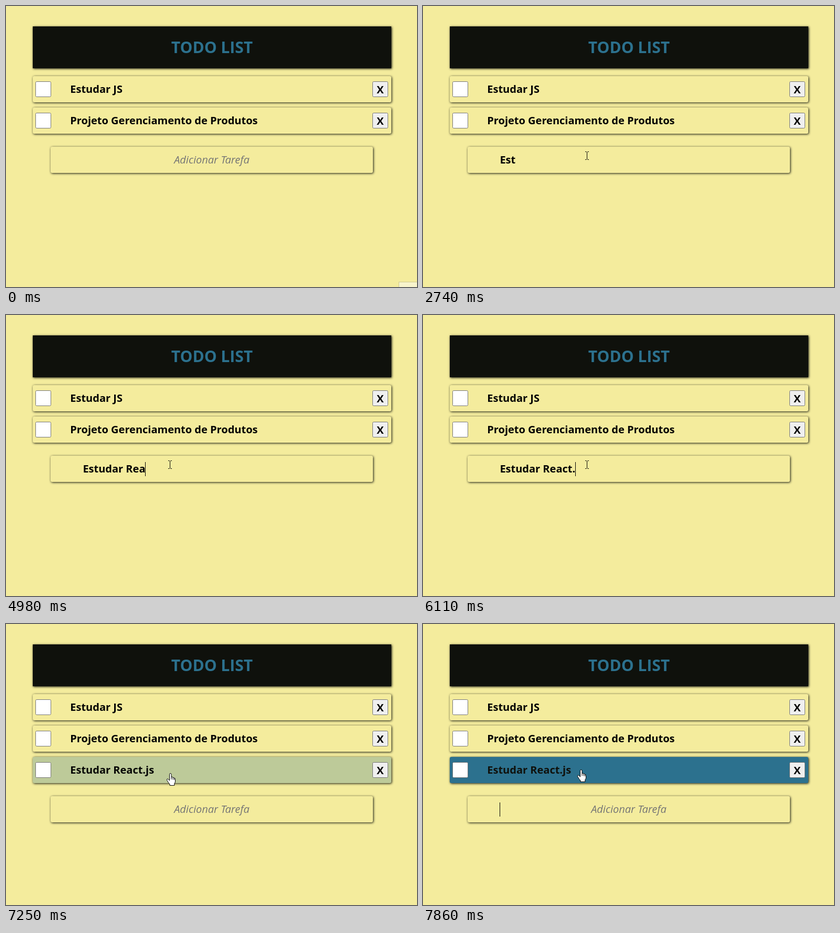
An HTML page that plays this animation: 783x537 px, repeating every 8000 ms.

```html
<!DOCTYPE html>
<html lang="pt">
<head>
<meta charset="utf-8">
<title>Todo list</title>
<style>
  html, body { margin: 0; width: 100%; height: 100%; overflow: hidden; background: #f4ec9d; }
  body { position: relative; font: bold 20px "Open Sans", sans-serif; color: #000; }
  body * { position: absolute; box-sizing: border-box; white-space: pre; }
  h1, .item, #field { margin: 0; box-shadow: 1px 1px 4px #0f110c; }
  h1 { left: 51px; top: 39px; width: 683px; height: 80px; background: #0f110c; color: #2c718e;
       font-size: 30px; line-height: 80px; text-align: center; }
  .item { left: 51px; width: 683px; height: 50px; line-height: 50px; border-radius: 3px; background: #f4ec9d; }
  .item b { left: 71.3px; }
  .item i, .item u { top: 10px; width: 30px; height: 30px; border: 1px solid #767676; border-radius: 2.5px; }
  .item i { left: 5px; background: #fff; }
  .item u { left: 647px; background: #efefef; line-height: 29px; text-align: center; text-decoration: none; color: #000; }
  #fresh { animation: hover .5s ease both paused; }
  @keyframes hover { to { background: #2c718e; color: #0f110c; } }
  #field { left: 85px; width: 614px; height: 50px; line-height: 50px; border-radius: 3px; background: #f4ec9d; }
  #hint { width: 100%; text-align: center; font-weight: 400; font-style: italic; color: #757575; }
  #typed { left: 61.4px; }
  #typed * { position: static; }
  #typed #caret { position: absolute; top: 12px; width: 1px; height: 27px; background: #000; }
  #tip { left: 748px; top: 527px; width: 60px; height: 30px; background: #f8f4cc; border: 1px solid #cfc993; }
  svg { left: 0; top: 0; overflow: visible; }
</style>
</head>
<body>
<h1>TODO LIST</h1>
<div class="item" style="top:134px"><i></i><b>Estudar JS</b><u>X</u></div>
<div class="item" style="top:194px"><i></i><b>Projeto Gerenciamento de Produtos</b><u>X</u></div>
<div class="item" id="fresh" style="top:254px"><i></i><b>Estudar React.js</b><u>X</u></div>
<div id="field"><span id="hint">Adicionar Tarefa</span><span id="typed"><span id="text"></span><span id="caret"></span></span></div>
<div id="tip"></div>
<svg id="pointer" width="1" height="1"><path id="shape" stroke="#000" stroke-linejoin="round"/></svg>
<script>
const $ = id => document.getElementById(id);
const LOOP = 8000, BLINK = 530, FOCUS = 1000, ENTER = 7190;
const task = 'Estudar React.js';
const keys = [1810, 2010, 2210, 2810, 3270, 3410, 3530, 3730, 4520, 4720, 4980, 5110, 5320, 6110, 6440, 6500];

// Paths start at the hotspot
const shapes = {
  arrow: 'M.5 .5V16.5L4.2 13L6.6 18.5L9 17.5L6.6 12.2H11.5Z',
  beam: 'M-3 -7.5H-.5M1.5 -7.5H4M.5 -7V7M-3 7.5H-.5M1.5 7.5H4',
  hand: 'M-1.5 1.5Q-1.5 -.5 .2 -.5Q2 -.5 2 1.5V6.5Q4.8 5.5 5 7.5Q7.2 6.7 7.6 8.6Q9.5 8.2 9.5 10.5V15Q9.5 17 7.8 19V22.5H-1V20' +
        'Q-3 18.5 -5.8 13.5Q-7.3 11 -6 10.2Q-4.5 9.5 -2.8 11.8L-1.5 13ZM2 6.5V11M5 7.5V11.5M7.6 8.6V12'
};

// The pointer is sampled by the screen: time, x, y, shape
const moves = [
  [200, 752, 528, 'arrow'], [270, 690, 505, 'arrow'], [340, 652, 490, 'arrow'],
  [540, 620, 465, 'arrow'], [600, 546, 402, 'arrow'], [670, 350, 298, 'beam'], [740, 314, 286, 'beam'],
  [940, 319, 281, 'beam'], [1070, 314, 285, 'beam'], [1130, 312, 286, 'beam'],
  [ENTER, 313, 286, 'hand'], [7730, 310, 284, 'hand'], [7790, 305, 281, 'hand'], [7860, 301, 279, 'hand']
];

function draw(t) {
  const added = t >= ENTER;
  const hit = keys.filter(k => k <= t);
  const count = added ? 0 : hit.length;
  const lastKey = hit.length ? hit[hit.length - 1] : FOCUS;

  $('text').textContent = task.slice(0, count);
  $('hint').hidden = count > 0;
  $('caret').hidden = t < FOCUS || Math.floor((t - lastKey) / BLINK) % 2 === 1;

  $('fresh').hidden = !added;
  $('fresh').style.animationDelay = `${ENTER - 35 - t}ms`;
  $('field').style.top = added ? '329px' : '269px';
  $('tip').style.opacity = Math.max(0, Math.min(1, (200 - t) / 130));

  const move = moves.filter(m => m[0] <= t).pop();
  $('pointer').style.display = move ? '' : 'none';
  if (move) {
    const [, x, y, kind] = move;
    $('pointer').style.transform = `translate(${x}px, ${y}px)`;
    $('shape').setAttribute('d', shapes[kind]);
    $('shape').setAttribute('fill', kind === 'beam' ? 'none' : '#fff');
  }
}

const start = performance.now();
function frame() {
  draw((performance.now() - start) % LOOP);
  requestAnimationFrame(frame);
}
frame();
</script>
</body>
</html>
```
